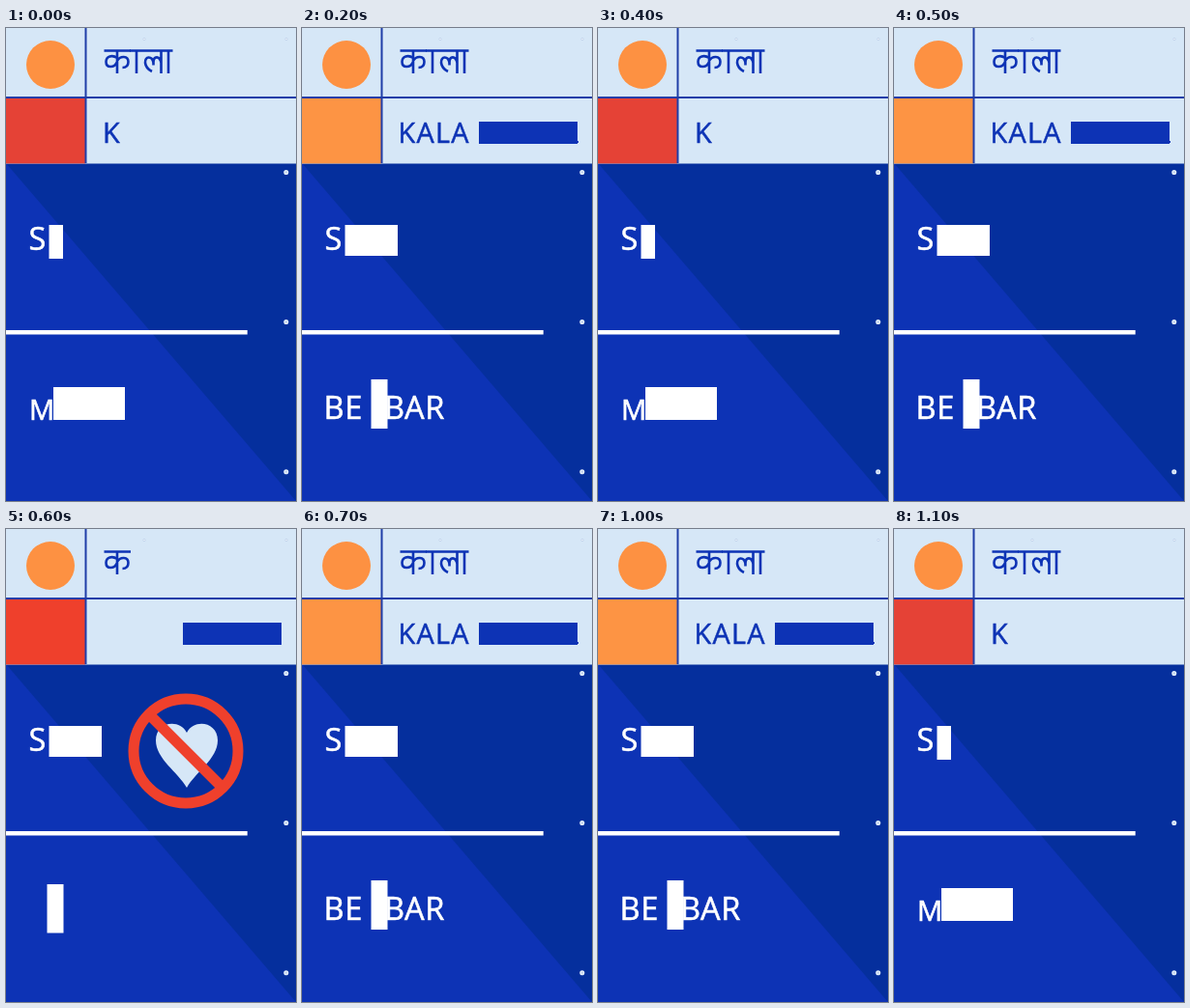
Write an HTML page that moves like this. It is 300 by 490 pixels and loops after 1200 ms.

```html
<!DOCTYPE html>
<html lang="hi">
<head>
<meta charset="utf-8">
<style>
  html, body { margin: 0; width: 100%; height: 100%; overflow: hidden; background: #052f9d; }
  svg { display: block; width: 300px; height: 490px; }
  text {
    font: 32.5px "Open Sans", "Noto Sans", sans-serif; letter-spacing: .7px;
    fill: #fff; stroke: #fff; stroke-width: .6;
  }
  text.code { font-size: 28.8px; letter-spacing: 1.3px; fill: #0d33b5; stroke: #0d33b5; stroke-width: .5; }
  .script { fill: none; stroke: #0d33b5; stroke-width: 2.6; }
  .ban { fill: none; stroke: #ef402c; stroke-width: 11; }
</style>
</head>
<body>
<svg viewBox="0 0 300 490">
  <path fill="#0d33b5" d="M0 140L300 490H0Z"/>
  <path fill="#d6e7f7" d="M0 0H300V140.4H0Z"/>
  <rect id="swatch" y="72" width="82" height="68.4"/>
  <path stroke="#1f3da8" stroke-width="2" d="M0 72H300M82.5 0V140"/>
  <circle cx="46" cy="38" r="25" fill="#fd9142"/>

  <g class="script" role="img" aria-label="काला">
    <path d="M101.5 23.5H129M115 23.5V47M115 31C110 27.5 103.5 29 103.5 35C103.5 41.5 112 42 115 35M115 34C118 28.5 126.5 28.5 126.5 35C126.5 39.5 124 41 120.5 41"/>
    <path data-on="abc" d="M128 23.5H172.5M135 23.5V47M160.5 23.5V47M168 23.5V47M160.5 36C159 28.5 152.5 28.5 152.5 36V38.5M152.5 36C151 28.5 143.5 29 144 36C144.5 40.5 147 43 151 45"/>
  </g>

  <text class="code" x="100" y="118.8" data-on="a">K</text>
  <text class="code" x="99.5" y="118.8" data-on="bc">KALA</text>
  <path fill="#0d33b5" data-on="bcd" d="M183 97H285V120H183Z"/>
  <path fill="#0d33b5" data-on="bc" d="M285 117H286V119H285Z"/>

  <text x="23.5" y="229.7" data-on="acd">S</text>
  <g data-on="b">
    <text x="23.5" y="229.7">SUMEDA</text>
    <text x="22.5" y="273.8">KA GHAR I</text>
    <text x="22.5" y="405.2">BEKHABAR</text>
  </g>
  <g data-on="a">
    <text x="23.9" y="405.5" style="font-size:29px">M</text>
    <path fill="#fff" d="M44.5 204H59V239H44.5ZM49 372H123V406H49Z"/>
  </g>
  <path fill="#fff" data-on="cd" d="M44.5 204H99V236H44.5Z"/>
  <g data-on="c">
    <text x="22.5" y="405.2">BE</text>
    <text x="85" y="405.2">BAR</text>
    <path fill="#fff" d="M71.5 364H88.5V415H71.5Z"/>
  </g>
  <g data-on="d">
    <path fill="#fff" d="M42.5 368H59.5V418.5H42.5Z"/>
    <path fill="#d6e7f7" d="M187 268C178 252 155 238 155 219C155 200 179 196 187 211C195 196 219 200 219 219C219 238 196 252 187 268Z"/>
    <path class="ban" d="M148 192L224 268"/>
    <circle class="ban" cx="186" cy="230" r="54"/>
  </g>

  <path fill="#fff" d="M0 313H249.7V317.4H0Z"/>
  <g fill="#b8cbea" stroke="#e4effb" stroke-width="1.5">
    <circle cx="289.8" cy="149.5" r="1.8"/>
    <circle cx="289.8" cy="304.5" r="1.8"/>
    <circle cx="289.8" cy="459.8" r="1.8"/>
  </g>
  <g fill="#edf5fc" stroke="#a9bddf" stroke-width=".5">
    <circle cx="143" cy="11.5" r="1.2"/>
    <circle cx="290" cy="11.5" r="1.2"/>
  </g>
</svg>
<script>
  const STEP = 100, poses = "aacbacdcaaca";
  const colors = { a: "#e54236", b: "#ffe11a", c: "#fd9444", d: "#ef402c" };
  const swatch = document.getElementById("swatch");
  const parts = document.querySelectorAll("[data-on]");
  const start = performance.now();

  function draw(now) {
    const t = Math.max(0, now - start);
    const pose = poses[Math.floor(t / STEP) % poses.length];
    swatch.setAttribute("fill", colors[pose]);
    for (const part of parts)
      part.style.display = part.dataset.on.includes(pose) ? "" : "none";
    requestAnimationFrame(draw);
  }
  draw(start);
</script>
</body>
</html>
```
